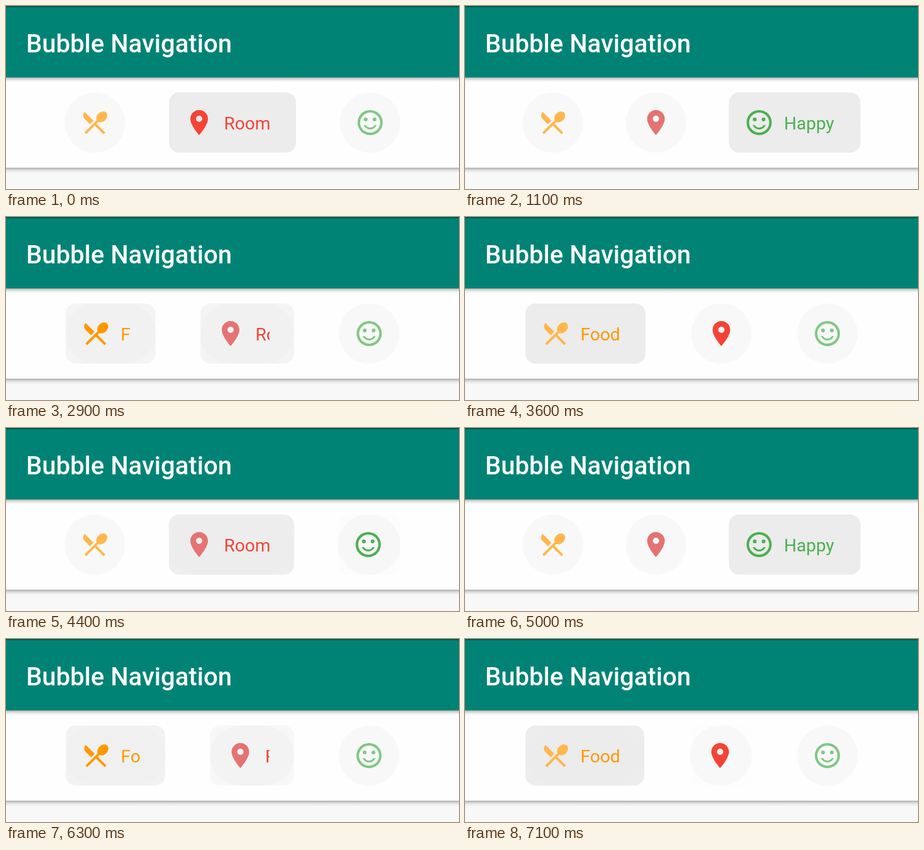
These frames come from a looping animation (720 px wide and 292 px high, 7200 ms). An HTML page:

```html
<!DOCTYPE html>
<html lang="en">
<head>
<meta charset="utf-8">
<title>Bubble Navigation</title>
<style>
  html, body { margin: 0; width: 100%; height: 100%; overflow: hidden; background: #f7f8f7; }
  svg { display: block; width: 100vw; height: 100vh; }
  text { font-family: Roboto, sans-serif; }
</style>
</head>
<body>
<svg id="stage" viewBox="0 0 720 292">
  <defs>
    <linearGradient id="shade" x1="0" y1="0" x2="0" y2="1">
      <stop offset="0" stop-color="#000" stop-opacity=".32"/>
      <stop offset=".3" stop-color="#000" stop-opacity=".16"/>
      <stop offset=".65" stop-color="#000" stop-opacity=".05"/>
      <stop offset="1" stop-color="#000" stop-opacity="0"/>
    </linearGradient>
  </defs>
  <rect width="720" height="292" fill="#f7f8f7"/>
  <rect y="114" width="720" height="144" fill="#fdfefd"/>
  <rect y="258" width="720" height="9" fill="url(#shade)"/>
  <rect width="720" height="114" fill="#008375"/>
  <rect width="720" height="2" fill="#00594e"/>
  <rect y="114" width="720" height="8" fill="url(#shade)"/>
  <text x="32" y="73.5" font-size="40" font-weight="500" fill="#fcfffd">Bubble Navigation</text>
  <g id="bar"></g>
</svg>
<script>
const LOOP = 7200, STEP = 100, DURATION = 500;
const SIZE = 96, PAD = 23.5, TOP = 138;
const FOOD = 0, ROOM = 1, HAPPY = 2;

const items = [
  { label: 'Food', grow: 95, on: '#ff9800', off: '#ffb74d',
    path: 'M8.1 13.34l2.83-2.83L3.91 3.5c-1.56 1.56-1.56 4.09 0 5.66l4.19 4.18zm6.78-1.81c1.53.71 3.68.21 5.27-1.38 1.91-1.91 2.28-4.65.81-6.12-1.46-1.46-4.2-1.1-6.12.81-1.59 1.59-2.09 3.74-1.38 5.27L3.7 19.87l1.41 1.41L12 14.41l6.88 6.88 1.41-1.41L13.41 13l1.47-1.47z' },
  { label: 'Room', grow: 106, on: '#f44336', off: '#e57373',
    path: 'M12 2C8.13 2 5 5.13 5 9c0 5.25 7 13 7 13s7-7.75 7-13c0-3.87-3.13-7-7-7zm0 9.5a2.5 2.5 0 1 1 0-5 2.5 2.5 0 0 1 0 5z' },
  { label: 'Happy', grow: 113, on: '#4caf50', off: '#81c784',
    path: 'M12 2a10 10 0 1 0 0 20 10 10 0 0 0 0-20zm0 18a8 8 0 1 1 0-16 8 8 0 0 1 0 16zM10 9.5a1.5 1.5 0 1 1-3 0 1.5 1.5 0 0 1 3 0zm7 0a1.5 1.5 0 1 1-3 0 1.5 1.5 0 0 1 3 0zM12 16c-1.48 0-2.75-.81-3.45-2H6.88c.8 2.05 2.79 3.5 5.12 3.5s4.32-1.45 5.12-3.5h-1.67c-.7 1.19-1.97 2-3.45 2z' }
];

// tap recolours the icons, start begins the resize
const taps = [
  { tap: 0, start: -DURATION, to: ROOM },
  { tap: 100, start: 300, to: HAPPY },
  { tap: 1600, start: 1870, to: ROOM },
  { tap: 2500, start: 2650, to: FOOD },
  { tap: 3600, start: 3650, to: ROOM },
  { tap: 4344, start: 4344, to: HAPPY },
  { tap: 5200, start: 5270, to: ROOM },
  { tap: 5980, start: 6000, to: FOOD },
  { tap: 7056, start: 7056, to: ROOM }
];

function add(parent, tag, attrs) {
  const el = document.createElementNS('http://www.w3.org/2000/svg', tag);
  set(el, attrs);
  parent.append(el);
  return el;
}

function set(el, attrs) {
  for (const key in attrs) el.setAttribute(key, attrs[key]);
}

const bar = document.getElementById('bar');
items.forEach((item, i) => {
  const clip = add(bar, 'clipPath', { id: 'clip' + i });
  item.clip = add(clip, 'rect', { x: 72, y: 0, height: SIZE });
  item.group = add(bar, 'g', {});
  item.base = add(item.group, 'rect', { height: SIZE, rx: SIZE / 2, fill: '#f7f8f7' });
  item.pill = add(item.group, 'rect', { height: SIZE, rx: 16, fill: '#ebeceb' });
  item.icon = add(item.group, 'path', { d: item.path, transform: 'translate(24 24) scale(2)', 'fill-rule': 'evenodd' });
  item.text = add(item.group, 'text', { x: 87.5, y: 58.7, 'font-size': 28, fill: item.on, 'clip-path': `url(#clip${i})` });
  item.text.textContent = item.label;
});

const ease = p => (1 - Math.cos(Math.PI * p)) / 2;

function draw(time) {
  const n = taps.findLastIndex(t => t.tap <= time);
  const { start, to } = taps[n];
  const from = n ? taps[n - 1].to : -1;
  const p = Math.min(1, Math.max(0, (time - start) / DURATION));
  const share = (i, v) => i === to ? v : i === from ? 1 - v : 0;

  const widths = items.map((item, i) => SIZE + Math.round(item.grow * share(i, ease(p))));
  const gap = (720 - 2 * PAD - widths.reduce((a, b) => a + b)) / 4;
  let x = PAD + gap;
  items.forEach((item, i) => {
    const width = widths[i];
    set(item.group, { transform: `translate(${x} ${TOP})` });
    set(item.base, { width });
    set(item.pill, { width, opacity: share(i, p) });
    set(item.icon, { fill: i === to ? item.on : item.off });
    set(item.clip, { width: Math.max(0, width - 111) });
    x += width + gap;
  });
}

const begin = performance.now();
function tick() {
  const time = (performance.now() - begin) % LOOP;
  draw(Math.floor(time / STEP) * STEP);
  requestAnimationFrame(tick);
}
tick();
</script>
</body>
</html>
```
